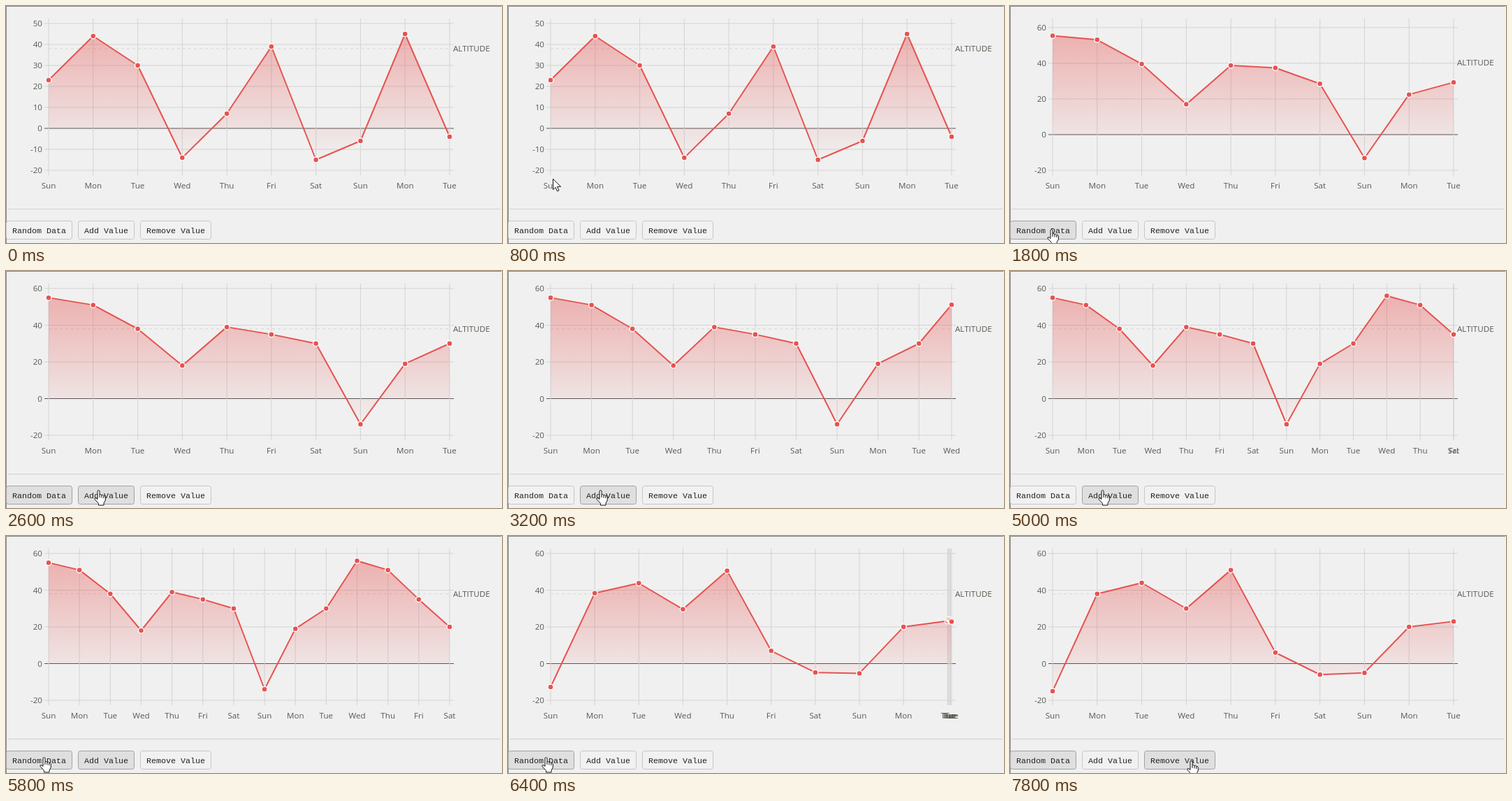
These frames come from a looping animation (710x339 px, 8000 ms). An HTML page:

```html
<!DOCTYPE html>
<html lang="en">
<head>
<meta charset="utf-8">
<title>Altitude chart</title>
<style>
  html, body { margin: 0; width: 100%; height: 100%; overflow: hidden; background: #f0f0f0; }
  svg { display: block; width: 100%; height: 100%; }
  text { font: 11.65px "Open Sans", "Noto Sans", sans-serif; fill: #555b51; text-anchor: middle; }
  .tick { text-anchor: end; }
  .marker { text-anchor: start; }
  .btn text { font: 11.67px "Liberation Mono", monospace; fill: #222; }
  .btn rect { fill: #f1f1f1; stroke: #c6c6c6; }
  .btn.on rect { fill: #dfdfdf; stroke: #a2a2a2; }
  .grid { stroke: #d3d3d3; }
  .zero { stroke: #555; }
  .dash { stroke: #d6d6d6; stroke-dasharray: 4 4; }
  .line { fill: none; stroke: #e65350; stroke-width: 2; stroke-linejoin: round; }
  .dot { fill: #e65350; stroke: #fafafa; stroke-width: 1.5; }
  .hand, .arrow { fill: #fff; stroke: #111; stroke-linejoin: round; }
</style>
</head>
<body>
<svg viewBox="0 0 710 339">
  <defs>
    <linearGradient id="fade" x1="0" y1="0" x2="0" y2="1">
      <stop offset="0" stop-color="#e65350" stop-opacity=".4"/>
      <stop offset=".5" stop-color="#e65350" stop-opacity=".2"/>
      <stop offset="1" stop-color="#e65350" stop-opacity="0"/>
    </linearGradient>
  </defs>
  <path d="M.5 339V.5H709" fill="none" stroke="#8a8a8a"/>
  <path d="M2 290.5H708" stroke="#d0d0d0"/>
  <g id="chart"></g>
  <g id="buttons"></g>
  <g id="cursor"></g>
</svg>
<script>
const LOOP = 8000, STEP = 200;
const LEFT = 61, RIGHT = 635, TOP = 25, BOTTOM = 235, MARK = 38;
const DAYS = ['Sun', 'Mon', 'Tue', 'Wed', 'Thu', 'Fri', 'Sat'];
const $ = id => document.getElementById(id);
const mix = (a, b, p) => a + (b - a) * p;

// One settled layout of the chart
function layout(values, gap) {
  const max = gap === 10 ? 50 : 60;
  const y = v => BOTTOM - (v + 20) * (BOTTOM - TOP) / (max + 20);
  const ticks = [];
  for (let v = -20; v <= max; v += gap) ticks.push({ v, y: y(v) });
  const dx = (RIGHT - LEFT) / (values.length - 1);
  const pts = values.map((v, i) => ({ x: LEFT + i * dx, y: y(v) }));
  return { pts, ticks, mark: y(MARK) };
}

const first = [23, 44, 30, -14, 7, 39, -15, -6, 45, -4];
const second = [55, 51, 38, 18, 39, 35, 30, -14, 19, 30, 56, 51, 35, 20];
const third = [-15, 38, 44, 30, 51, 6, -6, -5, 20, 23];
const grown = n => layout(second.slice(0, n), 20);

const scenes = [
  { at: -1000, dur: 1, to: layout(first, 10) },
  { at: 1600, dur: 444, to: grown(10), focus: 0 },
  { at: 3112, dur: 350, to: grown(11), focus: 1 },
  { at: 3800, dur: 350, to: grown(12), focus: 1 },
  { at: 4400, dur: 350, to: grown(13), focus: 1 },
  { at: 5000, dur: 350, to: grown(14), focus: 1 },
  { at: 6200, dur: 350, to: layout(third, 20), focus: 0 }
];

const buttons = [
  { x: 0.5, w: 94, label: 'Random Data' },
  { x: 103.5, w: 80, label: 'Add Value' },
  { x: 192.5, w: 101, label: 'Remove Value' }
];

// time, x, y of the pointer
const trail = [
  [200, 97, 30], [1000, 53, 319], [2000, 53, 319], [2600, 126, 313],
  [5400, 126, 313], [5800, 48, 316], [7400, 48, 316], [7800, 253, 321], [LOOP, 253, 321]
];

// cubic-bezier(.1, .8, .2, 1)
function ease(x) {
  if (x <= 0) return 0;
  if (x >= 1) return 1;
  const curve = (a, b, s) => 3 * a * s * (1 - s) ** 2 + 3 * b * s * s * (1 - s) + s ** 3;
  let lo = 0, hi = 1;
  for (let i = 0; i < 24; i++) {
    const mid = (lo + hi) / 2;
    if (curve(.1, .2, mid) < x) lo = mid; else hi = mid;
  }
  return curve(.8, 1, lo);
}

// Missing points start from, or end at, the last one
function blend(from, to, p) {
  const at = (list, i) => list[Math.min(i, list.length - 1)];
  const count = p < 1 ? Math.max(from.pts.length, to.pts.length) : to.pts.length;
  const pts = Array.from({ length: count }, (_, i) => {
    const a = at(from.pts, i), b = at(to.pts, i);
    return {
      x: mix(a.x, b.x, p),
      y: mix(a.y, b.y, p),
      day: DAYS[Math.min(i, to.pts.length - 1) % 7]
    };
  });
  const ticks = to.ticks.map((t, i) => ({ v: t.v, y: mix(at(from.ticks, i).y, t.y, p) }));
  return { pts, ticks, mark: mix(from.mark, to.mark, p) };
}

const rule = (cls, x1, y1, x2, y2) =>
  `<line class="${cls}" x1="${x1}" y1="${y1}" x2="${x2}" y2="${y2}"/>`;
const label = (cls, x, y, s) => `<text class="${cls}" x="${x}" y="${y}">${s}</text>`;

function drawChart({ pts, ticks, mark }) {
  const zero = ticks.find(t => t.v === 0).y;
  const path = pts.map(p => `${p.x.toFixed(2)},${p.y.toFixed(2)}`).join('L');
  let out = '';
  for (const t of ticks) {
    out += rule(t.v ? 'grid' : 'zero', 55, t.y, 641, t.y) + label('tick', 52, t.y + 4, t.v);
  }
  for (const p of pts) out += rule('grid', p.x, 18, p.x, 242) + label('', p.x, 261, p.day);
  out += rule('dash', LEFT, mark, RIGHT, mark) + label('marker', 640, mark + 4, 'ALTITUDE');
  out += `<path fill="url(#fade)" d="M${pts[0].x},${zero}L${path}L${pts[pts.length - 1].x},${zero}Z"/>`;
  out += `<path class="line" d="M${path}"/>`;
  for (const p of pts) out += `<circle class="dot" cx="${p.x}" cy="${p.y}" r="4"/>`;
  $('chart').innerHTML = out;
}

function pointer(t) {
  if (t < trail[0][0]) return null;
  const i = trail.findIndex(k => k[0] > t);
  const a = trail[i - 1], b = trail[i], p = (t - a[0]) / (b[0] - a[0]);
  return { x: mix(a[1], b[1], p), y: mix(a[2], b[2], p) };
}

function drawControls(pos, focus) {
  const over = pos ? buttons.findIndex(b =>
    pos.x + 6 >= b.x && pos.x + 6 <= b.x + b.w && pos.y >= 307 && pos.y <= 334) : -1;
  $('buttons').innerHTML = buttons.map((b, i) =>
    `<g class="btn${i === over || i === focus ? ' on' : ''}">
      <rect x="${b.x}" y="307.5" width="${b.w}" height="26" rx="3"/>
      ${label('', b.x + b.w / 2, 325, b.label)}</g>`).join('');

  const shape = over < 0
    ? '<path class="arrow" d="M.5.5V16L4 12.5L6.5 18L9 17L6.5 11.5H11.5Z"/>'
    : `<path class="hand" d="M5 1.5Q6.5-.3 8 1.5V7Q9.5 5.8 11 7.6Q12.6 6.6 13.8 8.4Q15.8 8 16.3 10V15L14 19V22H6.5V19.5L1 13.5Q.6 11 3 11.8L5 13.5Z"/>
       <path class="hand" d="M8 7V11M11 8V11.5M13.8 8.8V12"/>`;
  $('cursor').innerHTML = pos
    ? `<g transform="translate(${pos.x.toFixed(1)} ${pos.y.toFixed(1)})">${shape}</g>` : '';
}

function render(t) {
  let i = scenes.length - 1;
  while (scenes[i].at > t) i--;
  const now = scenes[i], before = scenes[Math.max(0, i - 1)];
  drawChart(blend(before.to, now.to, ease((t - now.at) / now.dur)));
  drawControls(pointer(t), now.focus);
}

const start = performance.now();
let shown = -1;
function tick() {
  const t = Math.floor((performance.now() - start) % LOOP / STEP) * STEP;
  if (t !== shown) render(shown = t);
  requestAnimationFrame(tick);
}
tick();
</script>
</body>
</html>
```
